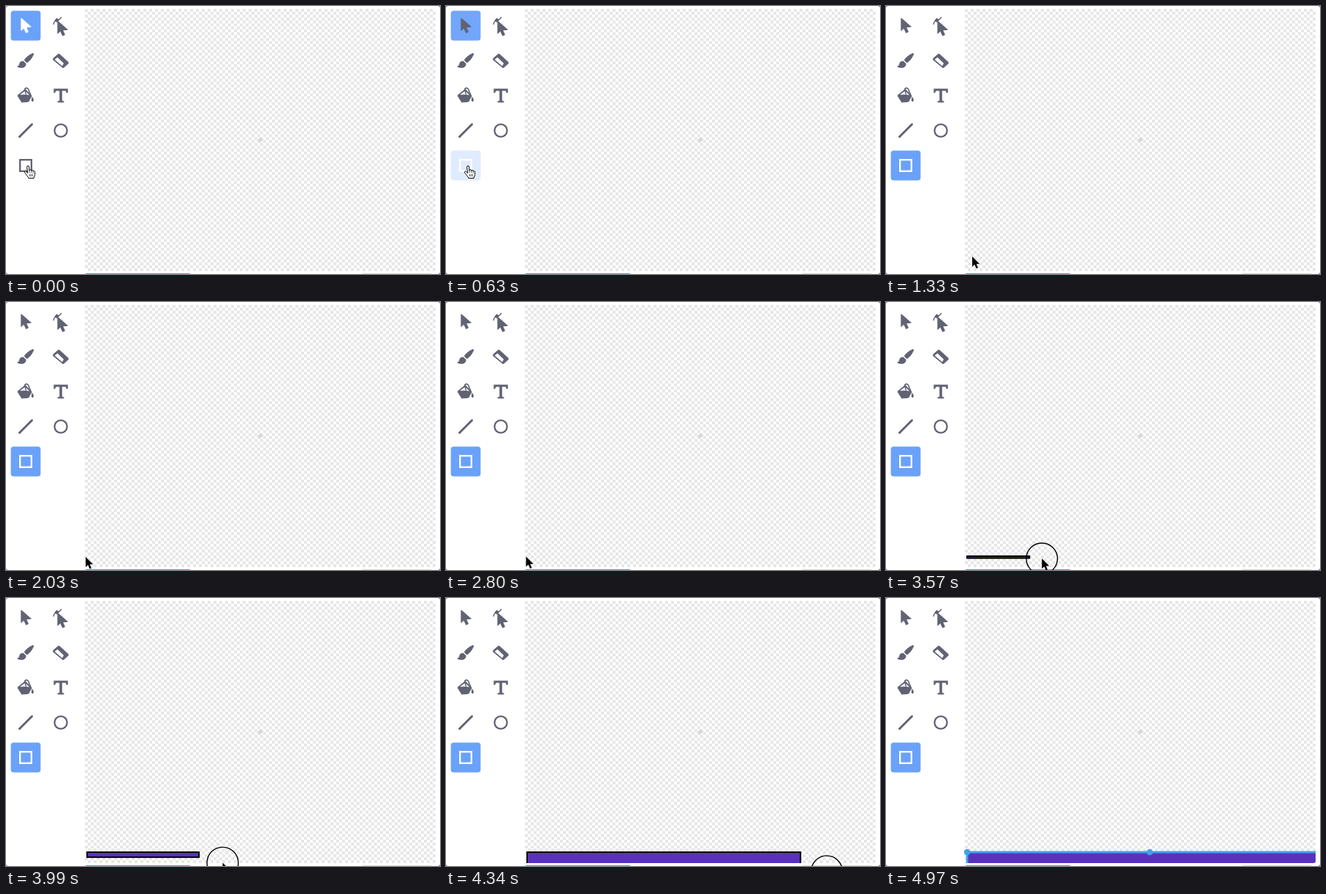
These frames come from a looping animation (594x368 px, 5.25 s). An HTML page:

```html
<!DOCTYPE html>
<html lang="en">
<head>
<meta charset="utf-8">
<title>Drawing a rectangle</title>
<style>
  html, body { margin: 0; width: 100%; height: 100%; overflow: hidden; background: #fff; }
  svg { display: block; }
  .icon { fill: #616273; }
  .line { fill: none; stroke: #616273; stroke-width: 2.3; }
  .active.icon { fill: #fff; }
  .active.line { stroke: #fff; }
  .hollow { fill: #fff; }
</style>
</head>
<body>
<svg width="594" height="368" viewBox="0 0 594 368">
  <defs>
    <pattern id="checker" x="108" y="4" width="8" height="8" patternUnits="userSpaceOnUse">
      <path d="M0 0h4v8h4v-4h-8z" fill="#e7e7e7" fill-rule="evenodd" shape-rendering="crispEdges"/>
    </pattern>
    <clipPath id="board"><rect x="107" y="3" width="481" height="361" rx="3"/></clipPath>
    <path id="tip" d="M20.3 17.2V33.4Q20.5 34.4 21.4 33.7L24.3 31L27 36.8Q27.4 37.4 28.1 37.1L30.4 36.1Q31 35.7 30.7 35L28.3 29.6L34.1 29.1Q35 28.7 34.3 27.9L21.5 16.7Q20.5 16.2 20.3 17.2Z"/>
  </defs>

  <!-- Window corners and the edge of the controls below -->
  <path d="M0 0h3a3 3 0 0 0-3 3zM594 0v3a3 3 0 0 0-3-3zM594 368h-3a3 3 0 0 0 3-3zM0 368v-3a3 3 0 0 0 3 3z" fill="#5b6570"/>
  <rect x="109" y="367" width="143" height="1" fill="#58a0b0"/>
  <rect x="487" y="367" width="95" height="1" fill="#dcdcdc"/>

  <!-- Select and reshape -->
  <rect id="selectBg" x="6.6" y="6.6" width="40.8" height="40.8" rx="4" fill="#6aa2fb"/>
  <use id="selectIcon" href="#tip" class="icon"/>
  <use href="#tip" class="icon" x="50" y="4"/>
  <path class="line" style="stroke-width:1.5" d="M65 25.5Q65.6 20.6 69.8 19.8T75.6 15"/>
  <rect class="icon" x="67.4" y="17.2" width="4.6" height="4.6" transform="rotate(45 69.7 19.5)"/>

  <!-- Brush and eraser -->
  <path class="icon" d="M37.7 65.1Q38.4 65.8 37.8 67Q34.4 74.5 28.8 78.2L24.7 74.4Q28.6 68.4 36 65Q37 64.5 37.7 65.1ZM23.6 75.4L27.7 79.2Q27.2 84.3 21.8 85Q17.4 85.4 14.7 83Q17.9 82.7 18.2 79.3Q18.9 75.3 23.6 75.4Z"/>
  <path class="icon" d="M70.9 66.1Q72.2 65 73.5 66.1L85.3 76.8Q86.4 78 85.3 79.2L79.5 84.4Q78.2 85.4 76.8 84.4L64.5 74.2Q63.4 73 64.5 71.8Z"/>
  <path class="hollow" d="M66.6 73.6L70.4 70.6L79 78.8L76.9 82.6Z"/>

  <!-- Bucket and text -->
  <path class="icon" d="M16.4 121.8L25.5 114.6Q26.5 114 27.4 114.8L34.8 122.2Q35.6 123.2 35 124.2L31.6 130.8Q31 131.8 29.8 131.9L22.8 132.6Q21.4 132.6 20.7 131.4L16 124Q15.4 122.7 16.4 121.8ZM35.4 124.2Q38.3 127.8 37.9 129.8Q37.5 131.3 36.2 131.3Q34.8 131 34.7 129.4Z"/>
  <path class="hollow" d="M19 122L26.2 116.5L32.2 122.4Q26 120.6 19 122Z"/>
  <path class="line" style="stroke-width:1.5" d="M27.6 121.6L25.6 115.4Q25.5 112.6 28 112.5Q30 112.6 31.2 115.6L34 123"/>
  <path class="icon" d="M65.3 113.6H84.7V119.2H82.6L81.7 116.4H76.8V130L79.4 130.7V132.5H70.6V130.7L73.2 130V116.4H68.3L67.4 119.2H65.3Z"/>

  <!-- Line, circle and rectangle -->
  <path class="line" style="stroke-width:3" stroke-linecap="round" d="M18.5 179.5L35.5 162.5"/>
  <circle class="line" cx="75" cy="171" r="8.6"/>
  <rect id="rectBg" x="6.6" y="198.6" width="40.8" height="40.8" rx="4" fill="#6aa2fb"/>
  <rect id="rectIcon" class="line" x="19.2" y="211.2" width="15.6" height="15.6"/>

  <!-- Drawing board -->
  <rect x="108" y="4" width="480" height="360" rx="3" fill="url(#checker)"/>
  <g fill="none" stroke="#cfcfcf">
    <circle cx="348" cy="184" r="2.4"/>
    <path d="M344.5 184h7M348 180.5v7"/>
  </g>
  <g clip-path="url(#board)">
    <rect id="shape" x="111" y="349" fill="#5a31bf" stroke="#000" stroke-width="2"/>
    <g id="selection" fill="#43a0e6">
      <path d="M111 400V349H611" fill="none" stroke="#43a0e6" stroke-width="3"/>
      <circle cx="111" cy="349" r="4.3"/>
      <circle cx="361" cy="349" r="4.3"/>
    </g>
  </g>

  <!-- Pointers -->
  <circle id="ring" r="21.4" fill="none" stroke="#000" stroke-width="1.4"/>
  <path id="arrow" d="M0 0V14L3.2 11L5.6 16.4L8 15.4L5.7 10.2H10.2Z" stroke="#fff" paint-order="stroke"/>
  <g id="hand" fill="none" stroke="#000" stroke-linejoin="round" stroke-linecap="round">
    <path fill="#fff" d="M-1.4 1.2Q-1.4-.5 0-.5T1.5 1.2L2 6Q2.4 4.7 3.6 4.8T4.8 6.3Q5.2 5.2 6.3 5.4T7.3 7Q7.8 6.2 8.7 6.5T9.6 8.2V11.5Q9.3 13.8 8.2 15V16.4H.8Q.2 14.7-1.4 12.7T-4.5 8.6Q-4.9 7.3-3.8 6.9T-1.6 8.1L-.6 9.2Z"/>
    <path stroke-width=".7" d="M2 6V8.6M4.8 6.5V8.6M7.3 7.2V9M2.4 11v2.6M4.4 11v2.6M6.4 11v2.6"/>
  </g>
</svg>
<script>
const LOOP = 5250, STEP = 70, LAG = 56;
const PICK = 630, LEAVE = 770, PRESS = 3080, DRAG = 3290, RELEASE = 4550, SELECT = 4970;
const ORIGIN = { x: 111, y: 349 };

const linear = p => p;
const speedUp = p => p ** 1.6;
const slowDown = p => 1 - (1 - p) ** 1.6;
const smooth = p => p * p * (3 - 2 * p);

const progress = (t, start, end) => Math.min(1, Math.max(0, (t - start) / (end - start)));
const mix = (a, b, p) => a + (b - a) * p;

// The pointer rests between these moves.
const rest = { x: 30, y: 220 };
const moves = [
  { start: PICK, end: 910, x: 98, y: 275, ease: speedUp },
  { start: 910, end: 1330, x: 118, y: 344, ease: slowDown },
  { start: 1330, end: 1610, x: 108, y: 353, ease: slowDown },
  { start: 1680, end: 2030, x: 109, y: 350, ease: linear },
  { start: 2730, end: PRESS, x: 111.5, y: 348, ease: linear },
  { start: 3220, end: DRAG, x: 128, y: 349, ease: linear },
  { start: DRAG, end: 3710, x: 256, y: 354, ease: linear },
  { start: 3920, end: 3990, x: 296.5, y: 363.5, ease: linear },
  { start: 3990, end: 4480, x: 611, y: 380, ease: linear }
];

function pointerAt(t) {
  return moves.reduce((from, m) => {
    const p = m.ease(progress(t, m.start, m.end));
    return { x: mix(from.x, m.x, p), y: mix(from.y, m.y, p) };
  }, rest);
}

const $ = id => document.getElementById(id);
const set = (id, name, value) => $(id).setAttribute(name, value);
const show = (id, on) => set(id, 'visibility', on ? 'visible' : 'hidden');

function draw(t) {
  const fade = smooth(progress(t, 570, LEAVE));
  set('selectBg', 'opacity', 1 - fade ** 2);
  set('rectBg', 'opacity', fade);
  $('selectIcon').classList.toggle('active', t < PICK);
  $('rectIcon').classList.toggle('active', t >= PICK);

  const pointer = pointerAt(t);
  for (const id of ['hand', 'arrow', 'ring']) {
    set(id, 'transform', `translate(${pointer.x} ${pointer.y})`);
  }
  show('hand', t < LEAVE);
  show('arrow', t >= LEAVE && t < RELEASE);
  show('ring', t >= PRESS && t < RELEASE);

  // The free corner trails the pointer.
  const corner = pointerAt(t - LAG);
  set('shape', 'width', Math.max(0.1, corner.x - ORIGIN.x));
  set('shape', 'height', Math.max(0.1, corner.y - ORIGIN.y));
  show('shape', t >= DRAG);
  show('selection', t >= SELECT);
}

const start = performance.now();
function tick() {
  const t = (performance.now() - start) % LOOP;
  draw(Math.floor(t / STEP) * STEP);
  requestAnimationFrame(tick);
}
tick();
</script>
</body>
</html>
```
